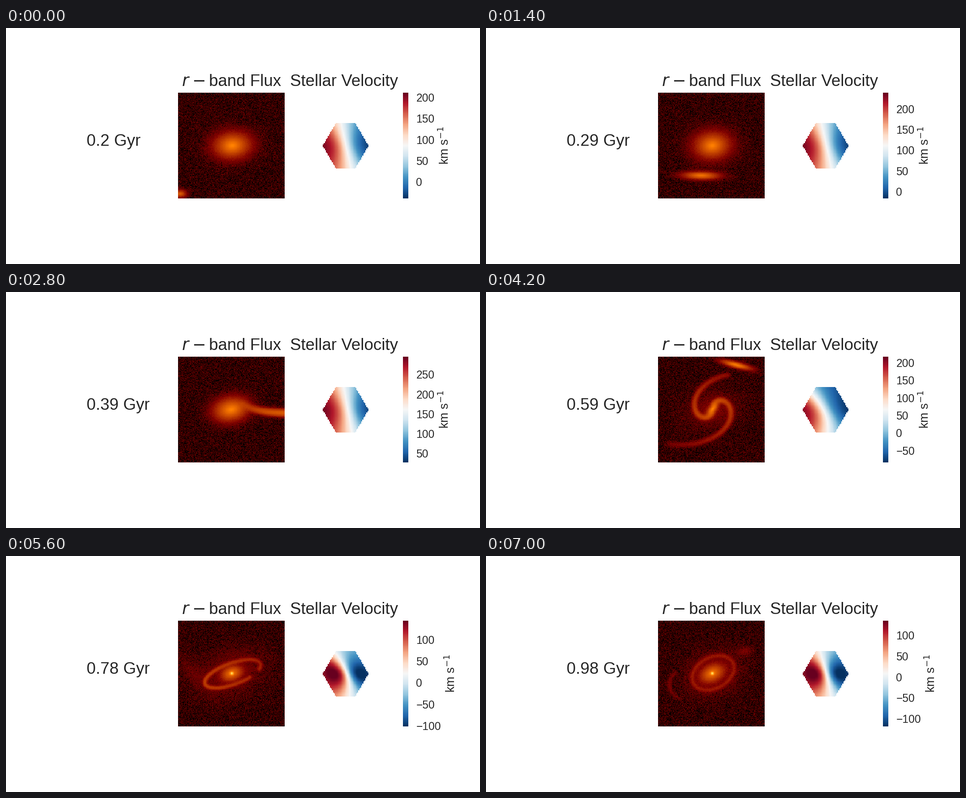
A matplotlib script for the animation above (8000 ms loop, 1058 by 529 pixels).

```python
import numpy as np
import matplotlib.pyplot as plt
from matplotlib.animation import FuncAnimation

W, H, DPI = 1058, 529, 64
INK = "#262626"
SANS = "Liberation Sans"
X0, X1, Y0, Y1 = 384, 622, 145, 382   # flux panel
N, CELLS = 200, 45                    # pixels of the two maps
STEP, HOLD = 200, 7                   # ms per frame, frames per scene
BIG, MID, SMALL = 36.8, 27, 24.5      # text heights in px

gx, gy = np.meshgrid(np.linspace(X0, X1, N), np.linspace(Y0, Y1, N))
axis = np.linspace(-0.98, 0.98, CELLS)
hu, hw = np.meshgrid(axis, axis)
outside = np.abs(hu) > 1.01 - 0.59 * np.abs(hw)


def turn(x, y, tilt):
    t = np.radians(tilt)
    return x * np.cos(t) - y * np.sin(t), x * np.sin(t) + y * np.cos(t)


def glow(cx, cy, a, b, tilt, peak, power=1.3):
    """Elliptical brightness that sinks to the sky level at radii a, b."""
    p, q = turn(gx - cx, gy - cy, tilt)
    return peak - (peak - 0.12) * np.hypot(p / a, q / b) ** power


def band(x, y, level, width):
    """Soft band of varying brightness along a curve."""
    out = np.full(gx.shape, -2.0)
    for px, py, v in np.broadcast(x, y, level):
        dist = (gx - px) ** 2 + (gy - py) ** 2
        np.maximum(out, v - 0.04 * dist / width**2, out=out)
    return out


def ring(cx, cy, a, b, tilt, start, stop, level, swing=0.0, width=3.2):
    """Elliptical arc, brightest at its far left end."""
    phi = np.radians(np.linspace(start, stop, 120))
    x, y = turn(a * np.cos(phi), -b * np.sin(phi), -tilt)
    return band(cx + x, cy + y, level - swing * np.cos(phi), width)


def spiral(start, flip):
    """One arm winding into the nucleus; flip = -1 gives its twin."""
    s = np.linspace(start, 216, 130)
    r = (41 + 85 * np.exp(-s / 40)) * (1 - (s / 229) ** 5)
    t = np.radians(39 + s)
    return band(506 + flip * r * np.cos(t), 262 - flip * r * np.sin(t),
                0.19 + 0.19 * np.sqrt(s / 216), 3.9)


def tail():
    x = np.linspace(530, 630, 60)
    ease = 1 - np.exp(-(x - 530) / 30)
    return band(x, 251 + 21 * ease, 0.26 + 0.17 * ease, 4.8)


def expose(seed, parts):
    """Add light and sky noise, then apply a logarithmic stretch."""
    light = sum(0.25 * 10 ** (5 * np.maximum(p, -2)) for p in parts)
    noise = np.random.default_rng(seed).normal(0.9, 1.0, gx.shape)
    return 0.2 * np.log10(np.maximum(light + noise, 0.25) / 0.25)


def rotation(slope, shift, warp=0.0, settled=False):
    """Disc velocity field; a settled disc peaks inside the map's edge."""
    p = hu - slope * hw - shift + warp * hw**2
    core, gain, fall = (0.6, 1.25, 1) if settled else (0.7, 1.15, 0.5)
    v = 0.5 - 0.5 * gain * p / (core**2 + p**2 + hw**2) ** fall
    return np.ma.array(np.clip(v, 0, 1), mask=outside)


def nucleus(cx):
    return glow(cx, 263, 8, 8, 0, 0.74, 1.1)


# snapshot number, velocity limits, velocity field, light
scenes = [
    (2, -38, 212, rotation(0.22, 0.02),
     [glow(505, 263, 66, 46, 4, 0.47), glow(505, 264, 28, 21, 8, 0.42),
      glow(388, 372, 22, 14, 0, 0.43)]),
    (3, -15, 240, rotation(0.22, 0.04),
     [glow(505, 263, 64, 48, 4, 0.46), glow(505, 264, 28, 21, 12, 0.42),
      glow(480, 331, 64, 14, -1, 0.48)]),
    (4, 29, 296, rotation(0.18, 0.1),
     [glow(502, 263, 60, 41, 11, 0.46, 1.5), glow(503, 264, 27, 17, 18, 0.42),
      tail()]),
    (6, -82, 218, rotation(0.5, -0.1, 0.3),
     [glow(506, 262, 27, 13, 52, 0.50), glow(505, 264, 52, 34, 15, 0.25),
      spiral(28, 1), spiral(0, -1),
      glow(559, 163, 54, 11, -14, 0.50)]),
    (8, -100, 145, rotation(0.34, 0.06, 0.22, True),
     [nucleus(504), glow(504, 263, 34, 23, 18, 0.45, 1.7),
      glow(504, 261, 66, 44, 20, 0.20, 2),
      ring(506, 264, 66, 24, 20, -25, 300, 0.32, 0.03, 2.9),
      glow(418, 262, 26, 9, -45, 0.16)]),
    (10, -117, 136, rotation(0.24, 0.04, 0.05, True),
     [nucleus(505), glow(505, 263, 40, 27, 24, 0.46, 1.5),
      glow(507, 263, 60, 46, 25, 0.22, 2),
      ring(507, 262, 50, 35, 28, 0, 360, 0.26),
      ring(440, 288, 31, 32, 0, 125, 255, 0.12, 0.08),
      glow(577, 213, 16, 9, 5, 0.20, 2)]),
]
images = [expose(s[0], s[4]) for s in scenes]

fig = plt.figure(figsize=(W / DPI, H / DPI), dpi=DPI, facecolor="white")
ax = fig.add_axes([0, 0, 1, 1])
ax.axis("off")


def write(x, y, text, px, font=SANS, **kw):
    return ax.text(x, y, text, fontsize=px * 72 / DPI, family=font, color=INK,
                   ha="left", va="baseline", **kw)


def picture(data, box, cmap):
    return ax.imshow(data, extent=box, cmap=cmap, vmin=0, vmax=1,
                     interpolation="nearest", aspect="auto")


flux = picture(images[0], (X0, X1, Y1, Y0), "afmhot")
velocity = picture(scenes[0][3], (707, 809, 315, 213), "RdBu_r")
picture(np.linspace(1, 0, 256)[:, None], (886, 898, Y1, Y0), "RdBu_r")
ax.set_xlim(0, W)
ax.set_ylim(H, 0)

write(392.5, 130, "r", BIG, "DejaVu Sans", style="italic")
write(415, 130, "\u2212", BIG, "DejaVu Sans")
write(453, 130, "band Flux", BIG)
write(634.3, 130, "Stellar Velocity", BIG)
clock = write(180, 263.5, "", BIG)
ticks = [write(915.4, 0, "", SMALL) for _ in range(6)]
unit = write(988.5, 306, "km s$^{-1}$", MID, rotation=90, rotation_mode="anchor")


def draw(i):
    k = i // HOLD
    snap, low, high, field, _ = scenes[k]
    flux.set_data(images[k])
    velocity.set_data(field)
    clock.set_text(f"{round(0.098 * snap, 2):g} Gyr")
    first = -(-low // 50) * 50
    for n, tick in enumerate(ticks):
        value = first + 50 * n
        tick.set_text(f"{value}".replace("-", "\u2212"))
        tick.set_y(381 - 236 * (value - low) / (high - low) + 8.8)
        tick.set_visible(value <= high)
    unit.set_x(988.5 + (14 if first <= -100 else 0))
    return [flux, velocity, clock, unit, *ticks]


anim = FuncAnimation(fig, draw, frames=8000 // STEP, interval=STEP,
                     repeat=True, repeat_delay=0, blit=False)
plt.show()
```
